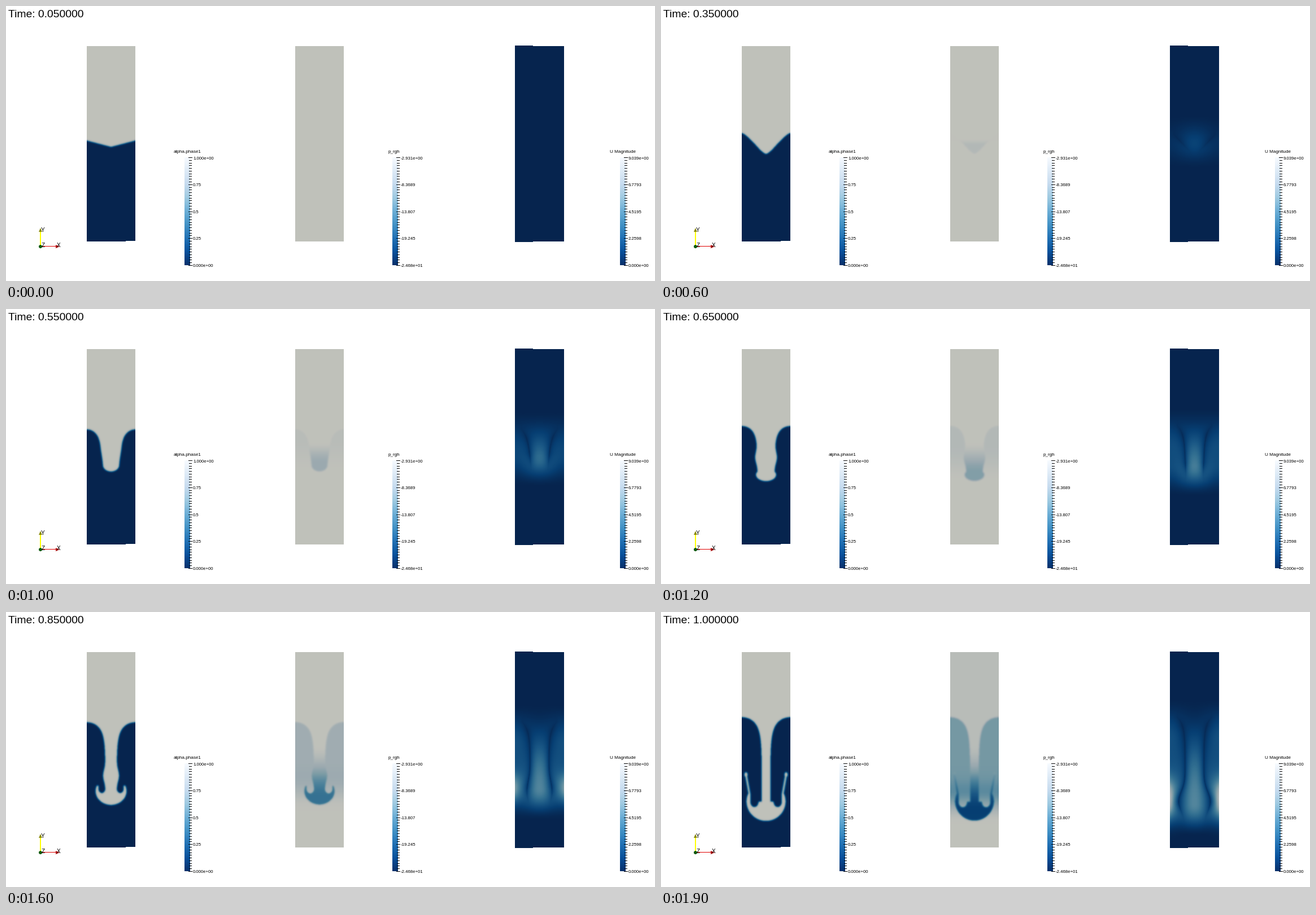
Write a matplotlib script that moves like this. It is 1149x487 px and loops after 2 s.

```python
import numpy as np
import matplotlib.pyplot as plt
from matplotlib.animation import FuncAnimation
from matplotlib.colors import ListedColormap
from matplotlib.patches import Circle, Polygon, Rectangle

W, H, DPI = 1149, 487, 64
PT = 72 / DPI
FRAMES, STEP = 20, 100
HALF, TOP, ROWS, FINE = 43, 71, 346, 2

blues = plt.get_cmap("Blues_r")(np.linspace(0, 1, 256))[:, :3]
bar_map = ListedColormap(blues)
lit_map = ListedColormap(blues * (0.777, 0.769, 0.733))
NAVY = lit_map(0)


def ramp(x, lo, hi):
    s = np.clip((x - lo) / (hi - lo), 0, 1)
    return s * s * (3 - 2 * s)


def bump(y, mid, width):
    return np.exp(-((y - mid) / width) ** 2)


def grid(n):
    """Distance from the centre line and height, n samples per pixel."""
    x = (np.arange(2 * HALF * n) + 0.5) / n - HALF
    y = (np.arange(ROWS * n) + 0.5) / n + TOP
    return np.meshgrid(np.abs(x), y)


U, Y = grid(1)
FU, FY = grid(FINE)


class Plume:
    """Heavy fluid sinking into light fluid, t in seconds of playback."""

    def __init__(self, t):
        self.t = t
        self.crest = 238 - 30 * t + 5 * (1 - np.exp(-5 * t))
        self.tip = 248 + 20.9 * np.log1p(np.exp((t - 0.62) / 0.22))
        self.column = ramp(t, 0.3, 1.2)     # from wedge to column
        self.rx = max(17.5 + 24 * (t - 1.2), 1)
        self.ry = max(11 + 33 * (t - 1.2), 1)
        self.cap = self.tip - self.ry

    def wedge(self, y):
        return HALF * (self.tip - y) / (self.tip - self.crest)

    def neck(self, y):
        """Half-width of the sinking column at each height."""
        t = self.t
        n = 7.3 + 7.7 * (1 - ramp(t, 1.1, 1.9))
        n = n + 4 * ramp(t, 0.9, 1.2) * (1 - ramp(t, 1.6, 1.9)) * bump(
            y, 263 + 67 * (t - 1.2), 14)
        drop = np.maximum(y - self.crest, 0)
        flare = 1 - np.sqrt(1 - np.exp(-drop / (9 + 5 * t)))
        end = np.clip((self.tip - y) / 10, 0, 1)
        width = (n + (HALF - n) * flare) * np.sqrt(1 - (1 - end) ** 2)
        width = self.wedge(y) + (width - self.wedge(y)) * self.column
        return np.where(y < self.crest, HALF + 1, width)

    def mushroom(self, u, y):
        """Bowl under the column, hollowed by a rounded pocket."""
        bowl = (u / self.rx) ** 2 + ((y - self.cap) / self.ry) ** 2 < 1
        arms = y > self.cap - 0.4 * self.ry
        pw = np.clip(16 * (self.t - 1.2), 0.1, 7.5)
        pu, ph = 0.6 * self.rx, 1.3 * pw
        py = self.tip - 12 - 0.35 * self.ry - ph
        low = ((u - pu) / pw) ** 2 + ((y - py) / ph) ** 2 < 1
        pocket = np.where(y < py, u < pu + pw, low)
        return bowl & arms & ~pocket

    def wisp(self, u, y):
        """Thin filament with a bead, pulled up from the bowl's rim."""
        g = ramp(self.t, 1.6, 1.9)
        u0, y0 = 0.86 * self.rx, self.cap - 0.4 * self.ry
        du, dy = 6 * g, -34 * g - 0.01
        s = np.clip(((u - u0) * du + (y - y0) * dy) / (du**2 + dy**2), 0, 1)
        thread = np.hypot(u - u0 - s * du, y - y0 - s * dy) < 1.4
        bead = np.hypot(u - u0 - du, (y - y0 - dy) * 0.7) < 2.7
        return (thread | bead) & (g > 0)

    def phase(self):
        mask = FU < self.neck(FY)
        if self.t > 1:
            mask |= self.mushroom(FU, FY) | self.wisp(FU, FY)
        return shrink(blur(mask.astype(float), 1.5 * FINE))

    def pressure(self, alpha):
        t = self.t
        heavy = 1 - 0.24 * t**2 * ramp(Y, 235, self.tip - 15)
        fade = 1 - ramp(Y, self.tip - 60, self.tip + 3)
        halo = 0.12 * ramp(t, 1.3, 1.9) * bump(Y, self.cap - 8, 26)
        light = 1 - 0.05 * t**3 * fade - halo
        haze = 0.05 * ramp(t, 1.6, 1.9) * (1 - ramp(Y, 300, 370))
        return alpha * heavy + (1 - alpha) * light - haze

    def speed(self):
        t, crest, tip, cap = self.t, self.crest, self.tip, self.cap
        # Line where the downward core meets the rising sides
        mid = 16 + 14 * np.exp(-np.maximum(Y - crest, 0) / 15)
        mid = mid + (0.8 * self.rx - 16) * ramp(t, 1, 1.4) * bump(Y, cap, 25)
        mid = self.wedge(Y) + (mid - self.wedge(Y)) * self.column
        mid = np.clip(mid, 5, 36)

        fall = 1 - ramp(Y, tip - 30, tip + 28)
        core = 0.5 * ramp(t, 0, 1.4) * fall * ramp(Y, crest - 35, cap)
        side = 0.21 * ramp(t, 0, 1.4) * fall * ramp(Y, crest - 35, crest + 40)
        base = core + (side - core) * ramp(U, 0, HALF)
        edge = ramp(Y, crest - 15, crest + 18) * (1 - ramp(Y, tip - 35, tip + 5))
        off = np.where(U < mid, U / mid, (HALF - U) / (HALF - mid))
        dip = np.clip(1 - off**2, 0, 1) ** 0.7
        outer = np.clip((U - mid) / (HALF - mid), 0, 1) ** 1.5
        hot = 0.7 * ramp(t, 1.2, 1.9) * bump(Y, cap - 6, 0.95 * self.ry + 1)
        return base * (1 - 0.85 * edge * (1 - dip)) + hot * outer


def blur(a, sigma):
    r = int(3 * sigma)
    k = np.exp(-0.5 * (np.arange(-r, r + 1) / sigma) ** 2)
    k /= k.sum()
    for _ in range(2):
        p = np.pad(a, ((r, r), (0, 0)), mode="edge")
        a = sum(w * p[i:i + len(a)] for i, w in enumerate(k)).T
    return a


def shrink(a):
    return a.reshape(ROWS, FINE, 2 * HALF, FINE).mean(axis=(1, 3))


def fields(i):
    plume = Plume(i * STEP / 1000)
    alpha = plume.phase()
    return alpha, plume.pressure(alpha), plume.speed()


frames = [fields(i) for i in range(FRAMES)]

fig = plt.figure(figsize=(W / DPI, H / DPI), dpi=DPI, facecolor="white")
ax = fig.add_axes([0, 0, 1, 1])
ax.axis("off")


def image(data, box, cmap):
    return ax.imshow(data, cmap=cmap, vmin=0, vmax=1, extent=box,
                     aspect="auto", interpolation="nearest")


def label(x, y, text, size, va="baseline"):
    return ax.text(x, y, text, fontsize=size * PT, va=va, ha="left",
                   color="black", family="Liberation Sans")


def rect(x, y, w, h, color):
    ax.add_patch(Rectangle((x, y), w, h, color=color, lw=0,
                           antialiased=False))


def color_bar(x, title, title_x, marks):
    image(np.linspace(1, 0, 256)[:, None], (x + 1, x + 11, 459, 268), bar_map)
    for n in range(41):
        major = n % 10 == 0
        rect(x + 9 - major, round(268 + n * 4.775), 5 + 2 * major, 1, "black")
    for n, mark in enumerate(marks.split()):
        label(x + 16, 269 + n * 47.6, mark, 7.7, "center_baseline")
    label(title_x, 260, title, 8.1)


boxes = [(143, 229, 417, 71), (512, 598, 417, 71), (901, 988, 417, 71)]
panels = [image(f, box, lit_map) for f, box in zip(frames[0], boxes)]
rect(212, 416, 17, 1, "white")
rect(901, 70, 32, 1, NAVY)
rect(901, 417, 32, 1, NAVY)

color_bar(315, "alpha.phase1", 297, "1.000e+00 0.75 0.5 0.25 0.000e+00")
color_bar(683, "p_rgh", 677, "-2.931e+00 -8.3689 -13.807 -19.245 -2.468e+01")
color_bar(1086, "U Magnitude", 1069,
          "9.039e+00 6.7793 4.5195 2.2598 0.000e+00")

# Orientation axes
rect(63, 425, 26, 1, "#e00000")
rect(60, 399, 2, 25, "#ffff00")
ax.add_patch(Polygon([(88, 423), (88, 429), (95, 426)], color="#b00000", lw=0))
ax.add_patch(Polygon([(58, 400), (64, 400), (61, 393)], color="#8a8a10", lw=0))
ax.add_patch(Circle((61, 426), 3, color="#0a5a0a", lw=0))
label(62, 400, "Y", 10)
label(63, 427, "Z", 10)
label(89.5, 427, "X", 10)

clock = label(4, 19.5, "", 19.4)
ax.set_xlim(0, W)
ax.set_ylim(H, 0)


def draw(i):
    for panel, data in zip(panels, frames[i]):
        panel.set_data(data)
    clock.set_text(f"Time: {0.05 * (i + 1):.6f}")
    return [*panels, clock]


anim = FuncAnimation(fig, draw, frames=FRAMES, interval=STEP,
                     init_func=lambda: draw(0), repeat=True, repeat_delay=0)
plt.show()
```
